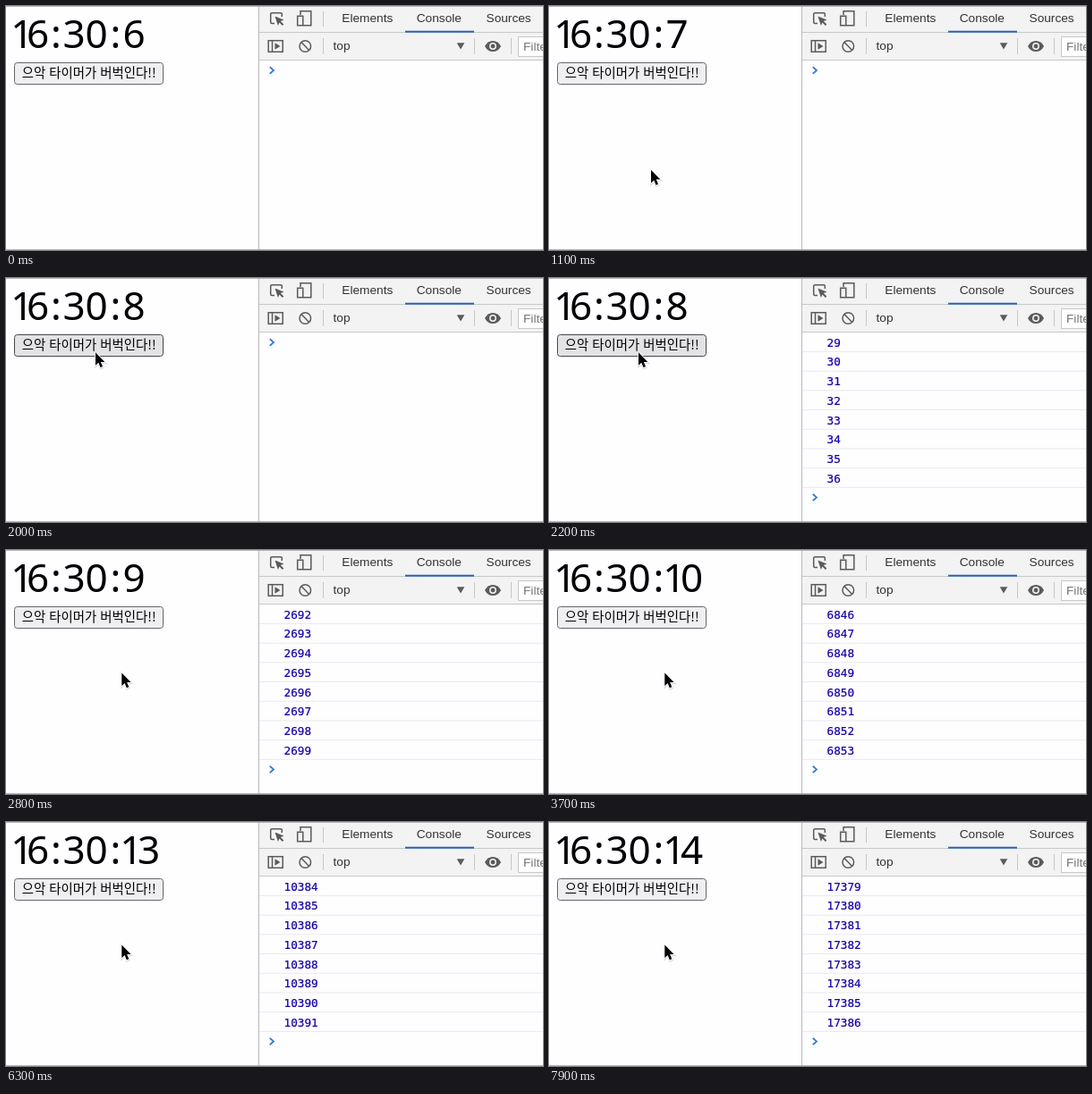
Write an HTML page that moves like this. It is 600 by 273 pixels and loops after 8000 ms.

```html
<!DOCTYPE html>
<html lang="ko">
<head>
<meta charset="utf-8">
<title>Timer and console</title>
<style>
  html, body { margin: 0; width: 100%; height: 100%; overflow: hidden; background: #fefdff; }
  svg { display: block; width: 600px; height: 273px; }
  .clock { font: 44px "Noto Sans", sans-serif; }
  .label { font: 500 14.4px "Noto Sans CJK KR", "Noto Sans CJK", sans-serif; text-anchor: middle; }
  .ui { font: 13.7px "Liberation Sans", Arial, sans-serif; fill: #333; }
  .log { font: 12.7px "DejaVu Sans Mono", monospace; fill: #1400a8; stroke: #1400a8; stroke-width: .2; }
  .icon { fill: none; stroke: #5a5a5a; stroke-width: 1.5; }
  .solid { fill: #5a5a5a; }
  .line { fill: none; stroke: #c8c8c8; }
</style>
</head>
<body>
<svg viewBox="0 0 600 273" xmlns="http://www.w3.org/2000/svg">
  <rect width="600" height="273" fill="#fefdff"/>

  <text id="clock" class="clock" y="47.3"></text>
  <rect id="button" x="9.5" y="63.5" width="166" height="24" rx="3"/>
  <text class="label" x="92.7" y="79.7">으악 타이머가 버벅인다!!</text>

  <rect x="283" y="1" width="317" height="59" fill="#f3f3f3"/>
  <path class="line" d="M283 29.5H600M283 60.5H600M354.5 6V23M354.5 36V54M523.5 36V54M564.5 36V54"/>
  <path d="M282.5 0V273M0 .5H600M0 272.5H600" stroke="#b9b9b9"/>
  <rect x="446" y="27.7" width="77" height="2" fill="#2d62bc"/>

  <g class="ui">
    <text x="375.3" y="18.2">Elements</text>
    <text x="458.7" y="18.2">Console</text>
    <text x="536.5" y="18.2">Sources</text>
    <text x="365.5" y="49.2">top</text>
  </g>

  <path class="icon" d="M300 19.5H297Q295.700 19.5 295.700 18V9Q295.700 7.700 297 7.700H307Q308.300 7.700 308.300 9V12"/>
  <path class="solid" d="M300.500 11.500L310.500 15.500L306.800 17L310.300 20.500L308.900 21.900L305.400 18.400L303.900 22Z"/>
  <path class="icon" d="M329 10V5.700H340.800V21.800H332.500M325.700 11.200H331.800V21.800H325.700Z"/>

  <rect class="icon" x="293.2" y="38.700" width="16" height="12.600"/>
  <path class="icon" d="M297.500 38.700V51.300"/>
  <path class="solid" d="M300.500 41.200L306.500 45L300.500 48.800Z"/>
  <circle class="icon" cx="334.300" cy="45" r="6.300"/>
  <path class="icon" d="M330 40.600L338.600 49.400"/>
  <path class="solid" d="M503.700 41.300H512.300L508 48.500Z"/>
  <path class="solid" d="M535 45Q538 39 544 39T553 45Q550 51 544 51T535 45Z"/>
  <circle cx="544" cy="45" r="3.200" fill="none" stroke="#f3f3f3" stroke-width="1.500"/>

  <rect x="572.5" y="34.5" width="40" height="22" fill="#fff" stroke="#c8c8c8"/>
  <text class="ui" x="578" y="49.7" style="fill:#757575">Filter</text>

  <g id="rows"></g>
  <path id="prompt" d="M294.800 -3.700L299 0L294.800 3.700" fill="none" stroke="#3b7bd6" stroke-width="1.800"/>

  <g id="cursor">
    <path d="M0 0V15.800L3.600 12.500L6 18.200L8.700 17.100L6.300 11.500H11.200Z" transform="translate(.3 1.2)"
      fill="#000" stroke="#000" stroke-width="2.500" opacity=".13"/>
    <path d="M0 0V15.800L3.600 12.500L6 18.200L8.700 17.100L6.300 11.500H11.200Z"
      fill="#000" stroke="#fff" stroke-width="1.800" stroke-linejoin="round" paint-order="stroke"/>
  </g>
</svg>
<script>
  const LOOP = 8000, STEP = 100, ROWS = 8, PITCH = 21.71;
  // [time, last logged number]
  const logs = [[2200, 36], [2800, 2699], [3700, 6853], [5700, 10391], [6900, 13902], [7900, 17386]];
  // [time, x, y] of the pointer tip
  const path = [
    [1000, 124, 217], [1200, 104, 150], [1400, 95, 85], [1600, 97, 89.3],
    [1800, 98, 88.5], [2000, 100, 83.3], [2200, 100, 83.3], [2600, 129.3, 137.5]
  ];

  const $ = id => document.getElementById(id);
  const clock = $("clock"), button = $("button"), rows = $("rows"), prompt = $("prompt"), cursor = $("cursor");

  function add(name, attrs) {
    const node = document.createElementNS("http://www.w3.org/2000/svg", name);
    for (const key in attrs) node.setAttribute(key, attrs[key]);
    return rows.appendChild(node);
  }

  const lines = Array.from({ length: ROWS }, (_, i) => {
    const y = 72 + i * PITCH;
    add("path", { d: `M283 ${y + 10.4}H600`, stroke: "#e9e9ee" });
    return add("text", { class: "log", x: 310.5, y: y + 4.7 });
  });

  function pointerAt(t) {
    const i = path.findIndex(key => key[0] > t);
    if (i < 0) return path[path.length - 1].slice(1);
    const [t0, x0, y0] = path[i - 1], [t1, x1, y1] = path[i];
    const u = (t - t0) / (t1 - t0), k = u * u * (3 - 2 * u);
    return [x0 + (x1 - x0) * k, y0 + (y1 - y0) * k];
  }

  function drawClock(t) {
    const sec = 6 + Math.floor((t + 700) / 1000);
    const tail = sec < 10 ? "130.5" : "127.3 147";
    clock.setAttribute("x", "5.2 23 50 63.5 88.5 116.5 " + tail);
    clock.textContent = "16:30:" + sec;
  }

  function drawPointer(t) {
    const shown = t >= path[0][0];
    cursor.style.display = shown ? "" : "none";
    let hover = false;
    if (shown) {
      const [x, y] = pointerAt(t);
      cursor.setAttribute("transform", `translate(${x} ${y}) scale(.92)`);
      hover = x > 9 && x < 176 && y > 63 && y < 88;
    }
    button.setAttribute("fill", hover ? "#e3e2e4" : "#efeef0");
    button.setAttribute("stroke", hover ? "#484848" : "#666");
  }

  function drawConsole(t) {
    const entry = logs.filter(log => log[0] <= t).pop();
    rows.style.display = entry ? "" : "none";
    prompt.setAttribute("transform", `translate(0 ${entry ? 245.5 : 72})`);
    if (entry) lines.forEach((line, i) => { line.textContent = entry[1] - ROWS + 1 + i; });
  }

  function render(ms) {
    const t = Math.floor((ms % LOOP) / STEP) * STEP;
    drawClock(t);
    drawPointer(t);
    drawConsole(t);
  }

  const start = performance.now();
  function tick() {
    render(performance.now() - start);
    requestAnimationFrame(tick);
  }
  tick();
</script>
</body>
</html>
```
